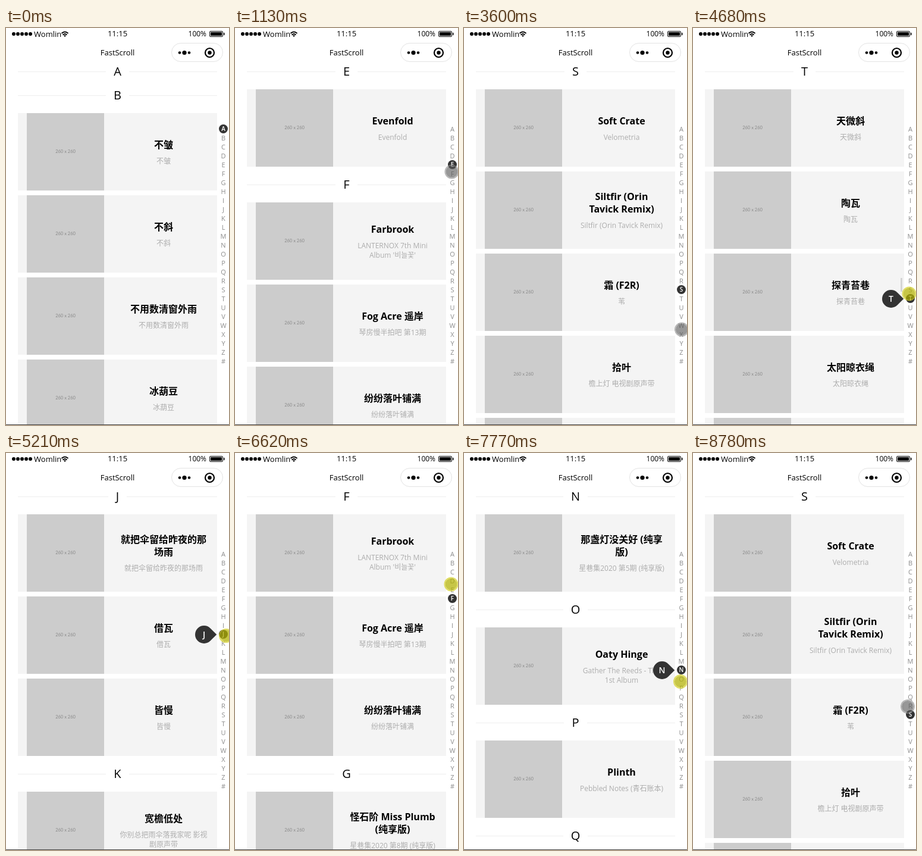
Recreate the animation shown at these times as an HTML page. Size 375 by 667 pixels, loop 8.86 s.

```html
<!DOCTYPE html>
<html lang="zh-CN">
<head>
<meta charset="utf-8">
<title>FastScroll</title>
<style>
* { box-sizing: border-box; }
html, body { margin: 0; width: 100%; height: 100%; overflow: hidden; background: #fff; }
body { font-family: 'Open Sans', 'Noto Sans CJK SC', 'Noto Sans CJK', sans-serif; color: #000; }
#stage { position: relative; width: 375px; height: 667px; overflow: hidden; background: #fff; }
#stage > * { position: absolute; }
svg { left: 0; top: 0; }
.bar { white-space: nowrap; line-height: 20px; font-size: 13px; }
#view { left: 0; top: 64px; width: 375px; height: 602px; overflow: hidden; }
#list { position: absolute; left: 20px; top: -1px; width: 335px; }
.head { display: flex; height: 20px; margin-bottom: 20px; font-size: 20px; line-height: 20px; }
.head i { flex: 1; height: 1px; margin-top: 10px; background: #eee; }
.head span { margin: 0 13px; }
.card { position: relative; height: 130px; margin-bottom: 8px; background: #f4f4f4; }
.pic { position: absolute; left: 15px; width: 130px; height: 130px; background: #ccc; color: #8a8a8a;
  font: 7.5px/130px Lato, sans-serif; text-align: center; }
.text { position: absolute; left: 145px; right: -10px; top: 0.5px; height: 130px; display: flex; flex-direction: column;
  justify-content: center; text-align: center; white-space: nowrap; }
.text b { font-size: 16px; line-height: 21px; margin-bottom: 9px; }
.text span { font-size: 12px; line-height: 16px; color: #adadad; }
#thumb { left: 349px; width: 3px; height: 23px; background: #b0b0b0; }
#index { left: 358px; top: 162px; width: 15px; }
#index div { height: 15px; line-height: 15px; font-size: 11px; color: #8c8c8c; border-radius: 50%;
  display: flex; justify-content: center; }
#index .on { background: #333; color: #fff; font-weight: 600; font-size: 10px; }
#bubble { z-index: 1; isolation: isolate; left: 318px; width: 30px; height: 30px; color: #fff;
  font-size: 14px; font-weight: 600; line-height: 30px; text-align: center; }
#bubble::before { content: ''; position: absolute; inset: 0; background: #333; z-index: -1;
  border-radius: 50% 50% 0 50%; transform: rotate(-45deg); }
#cursor { z-index: 2; left: -12px; top: -12px; width: 24px; height: 24px; border-radius: 50%;
  background-clip: padding-box; background-color: rgba(88,88,88,.62); border: 2px solid rgba(140,140,140,.62); }
#cursor.down { background-color: rgba(178,176,0,.72); border-color: rgba(214,210,40,.72); }
#edge { left: 0; top: 666px; width: 375px; height: 1px; background: #444; }
</style>
</head>
<body>
<div id="stage">
  <div id="view"><div id="list"></div></div>
  <svg width="375" height="64">
    <g id="signal"></g>
    <g fill="none" stroke="#000" stroke-width="1.9">
      <path d="M93.5 9 Q99 4 104.5 9"/>
      <path d="M95.5 11.6 Q99 8.2 102.5 11.6"/>
    </g>
    <path d="M97 12.8 Q99 11 101 12.8 L99 15 Z"/>
    <rect x="342.5" y="5.5" width="22" height="9" rx="1.5" fill="none" stroke="#000"/>
    <rect x="344" y="7" width="19" height="6"/>
    <rect x="366" y="8" width="1.5" height="4"/>
    <rect x="278.5" y="25.5" width="86" height="31" rx="15.5" fill="#fff" stroke="#e3e3e3"/>
    <circle cx="292" cy="41.5" r="2.3"/>
    <circle cx="300" cy="41.5" r="3.6"/>
    <circle cx="308" cy="41.5" r="2.3"/>
    <circle cx="342.5" cy="41.5" r="7.5" fill="none" stroke="#000" stroke-width="2.2"/>
    <circle cx="342.5" cy="41.5" r="3.2"/>
  </svg>
  <div class="bar" style="left:47px;top:0">Womlin</div>
  <div class="bar" style="left:0;width:375px;top:-1px;text-align:center">11:15</div>
  <div class="bar" style="right:38px;top:0;font-size:12px">100%</div>
  <div class="bar" style="left:0;width:375px;top:31px;text-align:center">FastScroll</div>
  <div id="thumb"></div>
  <div id="index"></div>
  <div id="bubble"></div>
  <div id="cursor"></div>
  <div id="edge"></div>
</div>
<script>
const LOOP = 8860, START = 670, TICK = 77.24;
const letters = [...'ABCDEFGHIJKLMNOPQRSTUVWXYZ#'];
const counts = [0, 5, 4, 3, 1, 3, 4, 3, 0, 3, 4, 5, 5, 1, 1, 1, 5, 4, 8, 6, 0, 0, 8, 9, 10, 8, 3];

// Cards as "title/subtitle", lines split by "|"; the subtitle defaults to the title.
const songs = {
  B: ['不皱', '不斜', '不用数清窗外雨', '冰葫豆'],
  E: ['Evenfold'],
  F: ["Farbrook/LANTERNOX 7th Mini|Album '비늘꽃'", 'Fog Acre 遥岸/琴房慢半拍吧 第13期', '纷纷落叶铺满'],
  G: ['怪石阶 Miss Plumb|(纯享版)/星巷集2020 第8期 (纯享版)'],
  J: ['就把伞留给昨夜的那|场雨/就把伞留给昨夜的那场雨', '借瓦', '皆慢'],
  K: ['宽檐低处/你别总把雨伞落我家呢 影视|剧原声带'],
  N: ['那盏灯没关好 (纯享|版)/星巷集2020 第5期 (纯享版)'],
  O: ['Oaty Hinge/Gather The Reeds - The|1st Album'],
  P: ['Plinth/Pebbled Notes (青石账本)'],
  S: ['Soft Crate/Velometria', 'Siltfir (Orin|Tavick Remix)/Siltfir (Orin Tavick Remix)',
      '霜 (F2R)/苇', '拾叶/檐上灯 电视剧原声带'],
  T: ['天微斜', '陶瓦', '探青苔巷', '太阳晾衣绳']
};
const spare = ['半格窗', '慢摇椅', '旧瓦檐', '三寸苔', '纸风铃'];

// Selected letter from each time on
const picks = [
  [0, 'A'], [660, 'E'], [1960, 'J'], [2890, 'S'], [4500, 'T'], [4740, 'R'], [4820, 'Q'], [4890, 'P'],
  [4970, 'N'], [5050, 'M'], [5130, 'K'], [5200, 'J'], [5270, 'I'], [5360, 'H'], [5510, 'G'], [5670, 'F'],
  [6670, 'E'], [6990, 'F'], [7060, 'G'], [7140, 'H'], [7290, 'I'], [7370, 'J'], [7450, 'K'], [7520, 'L'],
  [7600, 'M'], [7740, 'N'], [7830, 'O'], [7910, 'P'], [7990, 'Q'], [8070, 'R'], [8220, 'S']
];
// Pointer path: time, x, y
const path = [
  [670, 364, 222], [980, 364, 222], [1674, 366, 310], [1990, 366, 310], [2138, 369, 336], [2760, 366, 438],
  [3000, 366, 440], [3682, 366, 515], [3992, 366, 510], [4460, 363, 455], [4686, 363.5, 446.5],
  [5227, 370, 307], [5690, 364, 240], [6155, 364, 240], [6617, 363.5, 220.5], [6900, 364, 228],
  [7776, 364, 384], [8239, 363, 452], [8627, 363, 452], [8780, 361, 426]
];
const pressed = [[660, 800], [1890, 2040], [2820, 2960], [4440, 5900], [6600, 8530]];
const dragged = [[4500, 5900], [6670, 8530]];
// Scroll thumb: from, to, opacity
const bars = [[740, 820, 1], [820, 890, .5], [2040, 2360, 1], [2360, 2440, .5], [2960, 3280, 1],
  [3280, 3360, .5], [4570, 4650, 1], [4650, 4740, .45]];

const $ = id => document.getElementById(id);
const lines = s => s.replace('|', '<br>');
const within = (list, t) => list.find(r => t >= r[0] && t < r[1]);

function card(text) {
  const [title, sub = title] = text.split('/');
  return `<div class="card"><div class="pic">260 x 260</div>
    <div class="text"><b>${lines(title)}</b><span>${lines(sub)}</span></div></div>`;
}

const tops = {};
let total = 0, html = '';
letters.forEach((l, i) => {
  const n = counts[i], height = n ? 52 + 138 * n : 40;
  tops[l] = total;
  total += height;
  html += `<div style="height:${height}px"><div class="head"><i></i><span>${l}</span><i></i></div>`;
  for (let k = 0; k < n; k++) html += card((songs[l] || [])[k] || spare[(i + k) % spare.length]);
  html += '</div>';
});
$('list').innerHTML = html;
$('index').innerHTML = letters.map(l => `<div>${l}</div>`).join('');
$('signal').innerHTML = [0, 1, 2, 3, 4].map(i => `<circle cx="${13 + 7 * i}" cy="10" r="3"/>`).join('');
const marks = [...$('index').children];

function pointAt(t) {
  const i = path.findIndex(p => p[0] > t);
  if (i < 0) return path[path.length - 1].slice(1);
  if (i === 0) return path[0].slice(1);
  const a = path[i - 1], b = path[i], f = (t - a[0]) / (b[0] - a[0]);
  return [1, 2].map(k => a[k] + (b[k] - a[k]) * f);
}

function draw(time) {
  // After a still opening, the picture advances in even ticks.
  const n = Math.floor((time - START) / TICK + .25);
  const t = time < START ? 0 : START + TICK * n;
  const letter = picks.filter(p => p[0] <= t).pop()[1];
  const at = letters.indexOf(letter);
  const bar = within(bars, t);

  $('list').style.transform = `translateY(${-tops[letter]}px)`;
  marks.forEach((m, i) => m.classList.toggle('on', i === at));

  $('bubble').style.display = within(dragged, t) ? '' : 'none';
  $('bubble').style.top = 154.5 + 15 * at + 'px';
  $('bubble').textContent = letter;

  $('thumb').style.opacity = bar ? bar[2] : 0;
  $('thumb').style.top = Math.round(64 + tops[letter] * .0385) + 'px';

  const [x, y] = pointAt(t);
  $('cursor').style.display = t ? '' : 'none';
  $('cursor').style.transform = `translate(${x}px, ${y}px)`;
  $('cursor').classList.toggle('down', !!within(pressed, t));
}

const begin = performance.now();
function frame() {
  draw((performance.now() - begin) % LOOP);
  requestAnimationFrame(frame);
}
frame();
</script>
</body>
</html>
```
